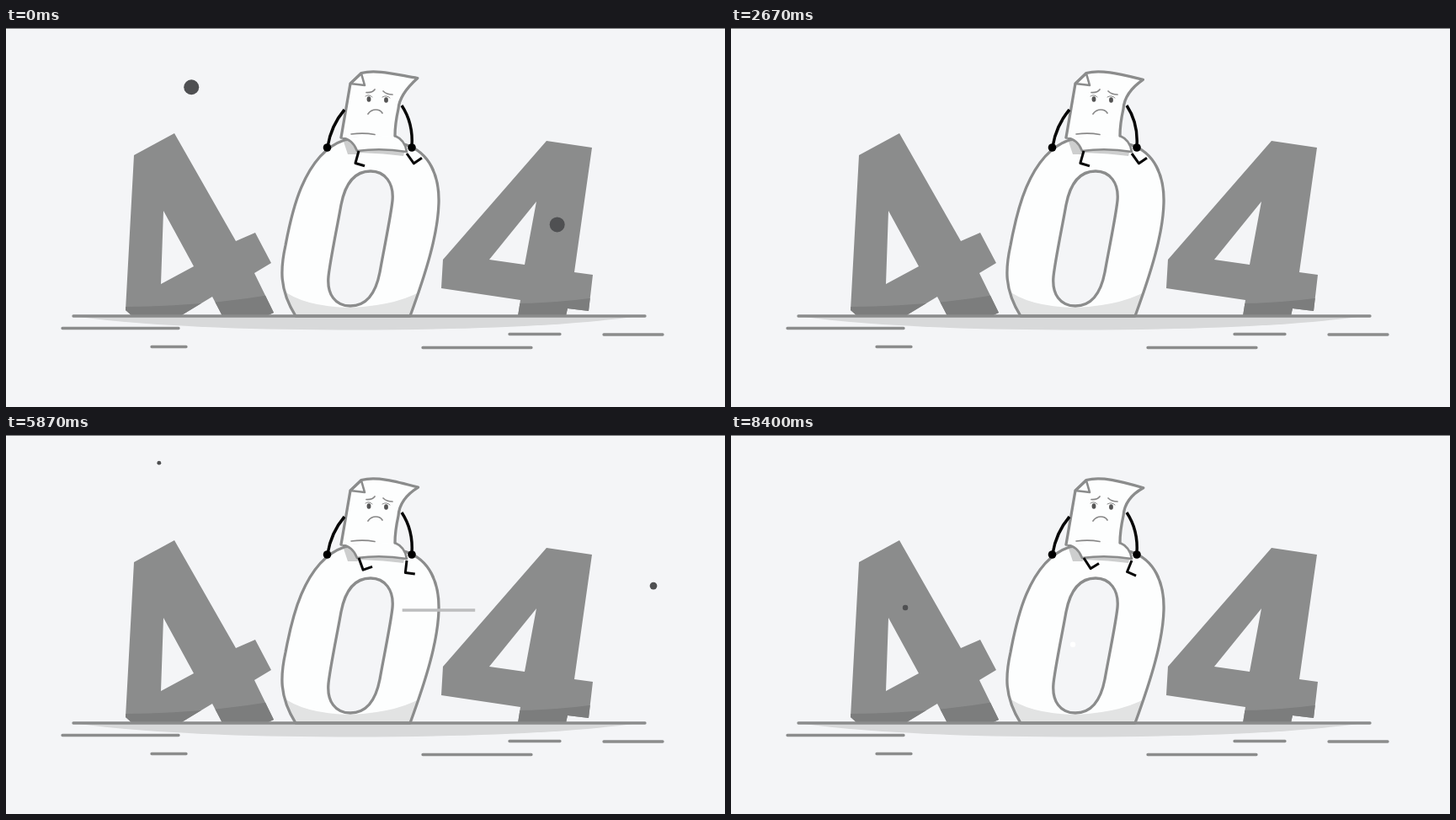
These frames come from a looping animation (854x450 px, 8.47 s). An HTML page:

```html
<!DOCTYPE html>
<html lang="en">
<head>
<meta charset="utf-8">
<title>404</title>
<style>
html, body { margin: 0; width: 100%; height: 100%; overflow: hidden; background: #f4f5f7; }
svg { display: block; width: 854px; height: 450px; }
.line { fill: none; stroke: #8b8c8c; stroke-width: 3.3; stroke-linecap: round; stroke-linejoin: round; }
.ink { fill: none; stroke: #060606; stroke-width: 3; stroke-linejoin: round; }
.thin { fill: none; stroke: #888; stroke-width: 1.7; stroke-linecap: round; }
</style>
</head>
<body>
<svg viewBox="0 0 854 450">
  <defs>
    <path id="left4" clip-rule="evenodd" d="M152 151L200 125 273 253 296 243 315 279 295 291 318 338 309 342H257L245 319 207 342H150L142 335ZM187 217L223 283 184 304Z"/>
    <path id="right4" clip-rule="evenodd" d="M642 134L696 142 675 290 697 293 692 336 667 333 665 342H608L611 323 517 309 519 275ZM630 206L616 281 574 275Z"/>
    <path id="zero" d="M344 342C324 310 326 285 332 258C338 226 352 150 402 133C430 127 455 132 476 139C502 148 515 174 514 208C513 245 499 290 480 342Z"/>
    <clipPath id="cl"><use href="#left4"/></clipPath>
    <clipPath id="cr"><use href="#right4"/></clipPath>
    <clipPath id="cz"><use href="#zero"/></clipPath>
  </defs>
  <path d="M0 .5H854" stroke="#77787a"/>
  <path d="M80 342H752Q640 358 415 358.500Q190 358 80 342Z" fill="#d8d9da"/>

  <g fill="#8b8c8c" fill-rule="evenodd">
    <use href="#left4"/><use href="#right4"/>
  </g>
  <path clip-path="url(#cl)" fill="#7c7d7d" d="M140 331Q230 331 320 316V345H140Z"/>
  <path clip-path="url(#cr)" fill="#7c7d7d" d="M600 327Q650 327 700 320V345H600Z"/>

  <use href="#zero" fill="#fdfefe"/>
  <path clip-path="url(#cz)" fill="#e2e3e3" d="M325 308Q350 331 410 332Q470 329 500 308V345H325Z"/>
  <path clip-path="url(#cz)" fill="#cdcece" d="M400 132L406 150H417L420 148Q450 149 472 152L474 144Z"/>
  <use href="#zero" class="line"/>
  <path class="line" style="fill:#f4f5f7" d="M433 170C450 170 461 184 459 205C457 224 449 262 444 290C439 316 427 330 409 330C391 330 381 316 383 295C385 276 393 238 398 210C403 184 415 170 433 170Z"/>

  <path class="line" d="M80 342H759M67 356.500H205M173 378.500H214M495 379.500H624M598 363.500H658M710 364H780"/>

  <path fill="#fdfefe" d="M398 130L462 127Q475 134 476 147Q446 142 417 146Q412 134 398 130Z"/>
  <path class="line" style="stroke-width:2.600" d="M398 130Q412 132 417 146Q446 142 476 147Q474 133 462 128"/>
  <path id="page" class="line" style="fill:#fdfefe"/>
  <path class="line" style="stroke-width:2.600" d="M409 66L422 54 426 68Z"/>
  <path class="thin" d="M410 126Q425 124 438 126.500M428 76.500Q435 77 438 73M448 75Q452 79 459 79M430 102C435 95 444 96 447 101"/>
  <path class="thin" style="stroke-width:1" d="M427 81Q431 78 435 82M447 82Q452 79 456 83"/>
  <g fill="#555"><ellipse cx="431" cy="84.500" rx="2.400" ry="3.300"/><ellipse cx="451.500" cy="85.500" rx="2.400" ry="3.300"/></g>
  <path class="ink" style="stroke-width:3.500" d="M402 97Q386 116 382 141M470 92Q484 113 482 141"/>
  <circle cx="381.500" cy="142" r="4.800"/><circle cx="482" cy="142" r="4.800"/>
  <path id="legL" class="ink" d="M419 146L418 161 429.500 162"/>
  <path id="legR" class="ink" d="M476 149L475 163.500 486.500 164.500"/>

  <circle id="tear" cx="428" fill="#5d9fdb"/>
  <g id="flyers"></g>
</svg>
<script>
const LOOP = 8470;
const $ = id => document.getElementById(id);

// Specks follow a cubic curve; r gives the radius along it.
const specks = [
  { fill: '#4f5052', starts: [-2286, 3130, 7714], time: 2857,
    curve: [[101, 198], [300, 258], [270, 80], [170, 26]],
    r: u => Math.min(9, 13.5 * u, 60 * (1 - u)) },
  { fill: '#4f5052', starts: [-443, 4339], time: 1930,
    curve: [[600, 225], [680, 250], [760, 220], [797, 132]],
    r: u => Math.min(9, 40 * u, 12.7 - 10.5 * u) },
  { fill: '#fff', starts: [457, 3986, 8319], time: 900,
    curve: [[385, 255], [460, 235], [560, 180], [558, 80]],
    r: u => 3 + 2 * u }
];
const streaks = [
  { y: 208, starts: [728, 5560], time: 1300 },
  { y: 31, starts: [3130], time: 1300 }
];
const tear = { starts: [1370, 4190, 6312], grow: 350, fall: 400 };

function set(el, attrs) {
  for (const k in attrs) el.setAttribute(k, attrs[k]);
}

function add(tag, attrs) {
  const el = document.createElementNS('http://www.w3.org/2000/svg', tag);
  set(el, attrs);
  return $('flyers').appendChild(el);
}

specks.forEach(s => s.el = add('circle', { fill: s.fill }));
streaks.forEach(s => s.el = add('path', { stroke: '#bcbdbe', 'stroke-width': 3.5 }));

// Progress 0..1 of the run under way, or -1 when idle.
function progress({ starts, time }, t) {
  const start = starts.find(s => t >= s && t < s + time);
  return start === undefined ? -1 : (t - start) / time;
}

function bezier([a, b, c, d], u) {
  const v = 1 - u;
  return [0, 1].map(i => v * v * v * a[i] + 3 * v * v * u * b[i] + 3 * v * u * u * c[i] + u * u * u * d[i]);
}

function drawLegs(t) {
  const s = Math.tanh(2 * Math.cos(2 * Math.PI * (t / 866 - .06)));
  set($('legL'), { transform: `rotate(${-14 - -27 * s} 419 146)` });
  set($('legR'), { transform: `rotate(${-9 - 32 * s} 476 149)` });
}

function drawPage(t) {
  const c = Math.cos(2 * Math.PI * (t / 1060 - .24));
  const x = 489 - 2 * c, y = 60 - 7 * c;
  set($('page'), {
    d: `M398 130L409 66 422 53.500C440 49 462 ${55 + c} ${x} ${y}C${477 + 3 * c} ${y + 10 + 6 * c} 467 82 466 96Q462 114 462 128`
  });
}

function drawTear(t) {
  const start = tear.starts.find(s => t > s - tear.grow && t < s + tear.fall);
  const fall = Math.max(0, t - start) / 1000;
  const r = start ? Math.min(5, 5 * (t - start + tear.grow) / tear.grow) : 0;
  set($('tear'), { cy: 95 + 1475 * fall * fall, r });
}

function drawSpeck(s, t) {
  const u = progress(s, t);
  const [cx, cy] = bezier(s.curve, u);
  set(s.el, { cx, cy, r: u < 0 ? 0 : s.r(u) });
}

function drawStreak(s, t) {
  const u = progress(s, t);
  const tail = 430 + 302 * Math.sin(Math.PI * u / 2) ** 2;
  const head = 430 + 302 * (1 - (1 - u) ** 2);
  set(s.el, { d: u < 0 ? '' : `M${tail} ${s.y}H${head}` });
}

function draw() {
  const t = performance.now() % LOOP;
  drawLegs(t);
  drawPage(t);
  drawTear(t);
  specks.forEach(s => drawSpeck(s, t));
  streaks.forEach(s => drawStreak(s, t));
  requestAnimationFrame(draw);
}
draw();
</script>
</body>
</html>
```
